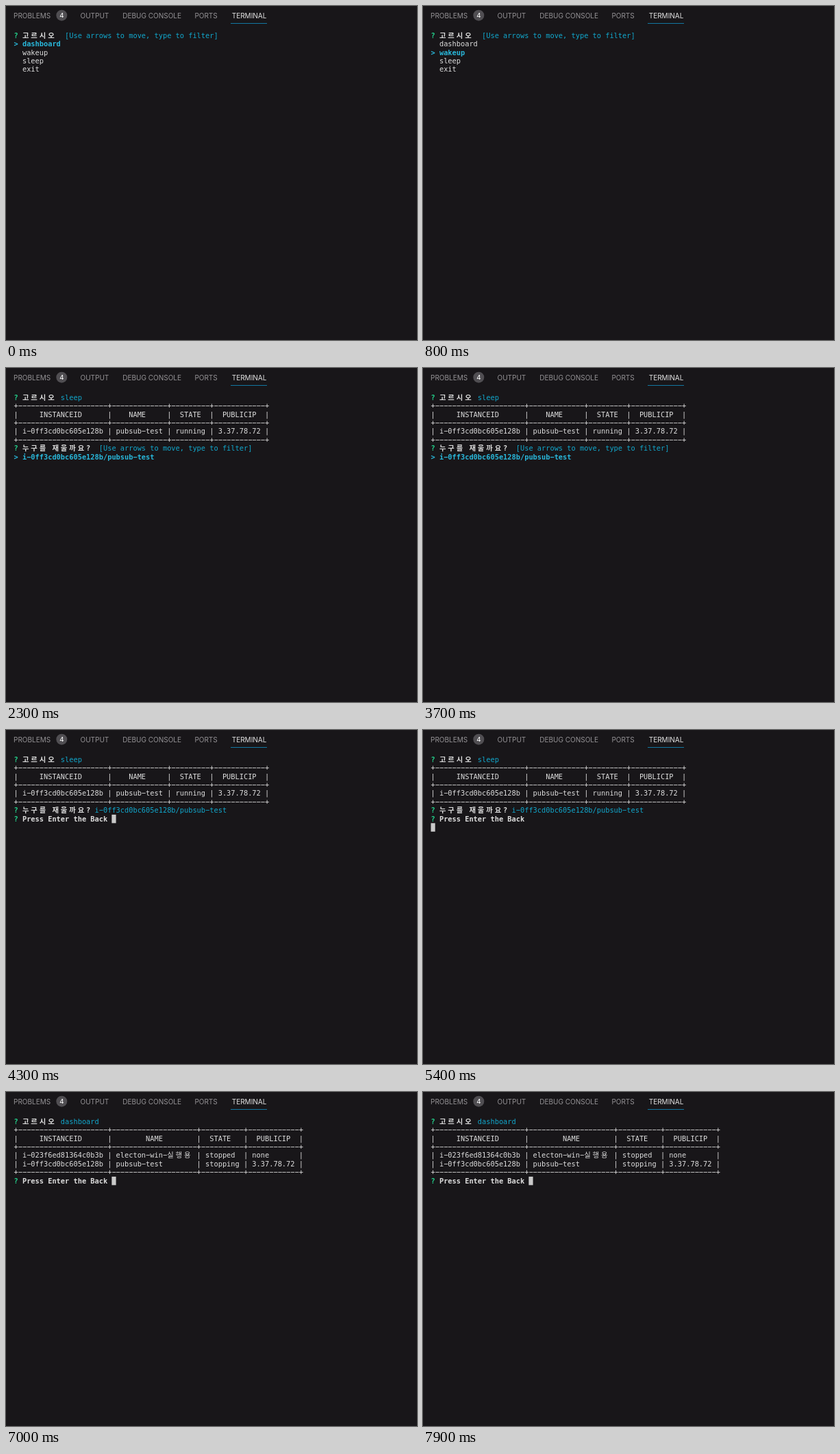
Animation of 600x489 px, one loop 8000 ms. Source, as an HTML page with a canvas:

```html
<!DOCTYPE html>
<html lang="ko">
<head>
<meta charset="utf-8">
<title>Terminal session</title>
<style>
  html, body { margin: 0; width: 100%; height: 100%; overflow: hidden; background: #181619; }
  canvas { display: block; }
</style>
</head>
<body>
<canvas width="600" height="489"></canvas>
<script>
const ctx = document.querySelector('canvas').getContext('2d');
const LOOP = 8000;
const CELL = { w: 6.212, h: 12.43, left: 11.5, top: 36.9, baseline: 9.8 };
const MONO = '10.32px "DejaVu Sans Mono", "Noto Sans CJK KR", "Noto Sans CJK", monospace';
const HANGUL = '10.32px "Noto Sans CJK KR", "Noto Sans CJK", "Noto Sans CJK JP", sans-serif';
const UI = 'Inter, sans-serif';

const isWide = ch => /[가-힣]/.test(ch);
const textWidth = text => [...text].reduce((sum, ch) => sum + (isWide(ch) ? 2 : 1), 0);

// Segments are [text, color, bold]; a screen is a list of rows of segments.
const plain = text => [text, '#dedede', false];
const strong = text => [text, '#dedede', true];
const cyan = text => [text, '#11a8cd', false];
const active = text => [text, '#29b8db', true];
const mark = ['? ', '#23d18b', true];
const cursor = ['█'];

const hint = cyan(' [Use arrows to move, type to filter]');
const ask = (question, reply) => [mark, strong(question + ' '), reply];
const pressEnter = [mark, strong('Press Enter the Back ')];

const options = ['dashboard', 'wakeup', 'sleep', 'exit'];
const menu = selected => [
  ask('고르시오', hint),
  ...options.map((name, i) => [i === selected ? active('> ' + name) : plain('  ' + name)]),
];
const chosen = name => ask('고르시오', cyan(name));

function table(records) {
  const headers = ['INSTANCEID', 'NAME', 'STATE', 'PUBLICIP'];
  const widths = headers.map((h, i) => 2 + Math.max(...[h, ...records.map(r => r[i])].map(textWidth)));
  const border = '+' + widths.map(w => '-'.repeat(w) + '+').join('');
  const line = cells => '|' + cells.join('|') + '|';
  const center = (text, w) => {
    const gap = w - textWidth(text), before = gap >> 1;
    return ' '.repeat(before) + text + ' '.repeat(gap - before);
  };
  const padded = (text, w) => ' ' + text + ' '.repeat(w - 1 - textWidth(text));
  return [
    border,
    line(headers.map((h, i) => center(h, widths[i]))),
    border,
    ...records.map(r => line(r.map((text, i) => padded(text, widths[i])))),
    border,
  ].map(text => [plain(text)]);
}

const id = 'i-0ff3cd0bc605e128b';
const target = id + '/pubsub-test';
const sleepTable = [chosen('sleep'), ...table([[id, 'pubsub-test', 'running', '3.37.78.72']])];
const picked = [...sleepTable, ask('누구를 재울까요?', cyan(target))];
const dashboard = [chosen('dashboard'), ...table([
  ['i-023f6ed81364c0b3b', 'electon-win-실행용', 'stopped', 'none'],
  [id, 'pubsub-test', 'stopping', '3.37.78.72'],
])];

const timeline = [
  [0, menu(0)],
  [700, menu(1)],
  [900, menu(2)],
  [1400, [chosen('sleep'), [cursor]]],
  [1700, [...sleepTable, ask('누구를 재울까요?', hint), [active('> ' + target)]]],
  [3800, [...picked, [cursor]]],
  [4200, [...picked, [...pressEnter, cursor]]],
  [5400, [...picked, pressEnter, [cursor]]],
  [5500, menu(0)],
  [6800, [chosen('dashboard'), [cursor]]],
  [7000, [...dashboard, [...pressEnter, cursor]]],
];

function label(text, x, y, color, font) {
  ctx.font = font;
  ctx.fillStyle = color;
  ctx.fillText(text, x, y);
}

function drawTabs() {
  const tabs = [['PROBLEMS', 11], ['OUTPUT', 108.5], ['DEBUG CONSOLE', 170.3], ['PORTS', 275.4], ['TERMINAL', 329.7]];
  for (const [name, x] of tabs)
    label(name, x, 17.5, name === 'TERMINAL' ? '#e4e4e4' : '#959396', `10px ${UI}`);
  ctx.fillStyle = '#504e52';
  ctx.beginPath();
  ctx.arc(81.3, 13.7, 8, 0, 2 * Math.PI);
  ctx.fill();
  label('4', 78.2, 17.2, '#f2f2f2', `500 9.5px ${UI}`);
  ctx.fillStyle = '#1278a2';
  ctx.fillRect(328, 25, 53, 1);
}

function drawRow(segments, row) {
  const y = CELL.top + row * CELL.h;
  let col = 0;
  for (const [text, color, bold] of segments) {
    for (const ch of text) {
      const x = CELL.left + col * CELL.w;
      if (ch === '█') {
        ctx.fillStyle = '#cacaca';
        ctx.fillRect(x, y, CELL.w, CELL.h);
      } else if (ch !== ' ') {
        // The minus glyph gives the long dash of the terminal face.
        const glyph = ch === '-' ? '\u2212' : ch;
        label(glyph, x, y + CELL.baseline, color, (bold ? 'bold ' : '') + (isWide(ch) ? HANGUL : MONO));
      }
      col += isWide(ch) ? 2 : 1;
    }
  }
}

function draw() {
  const time = performance.now() % LOOP;
  const [, screen] = timeline.findLast(([start]) => start <= time);
  ctx.fillStyle = '#181619';
  ctx.fillRect(0, 0, 600, 489);
  drawTabs();
  screen.forEach(drawRow);
  requestAnimationFrame(draw);
}
draw();
</script>
</body>
</html>
```
